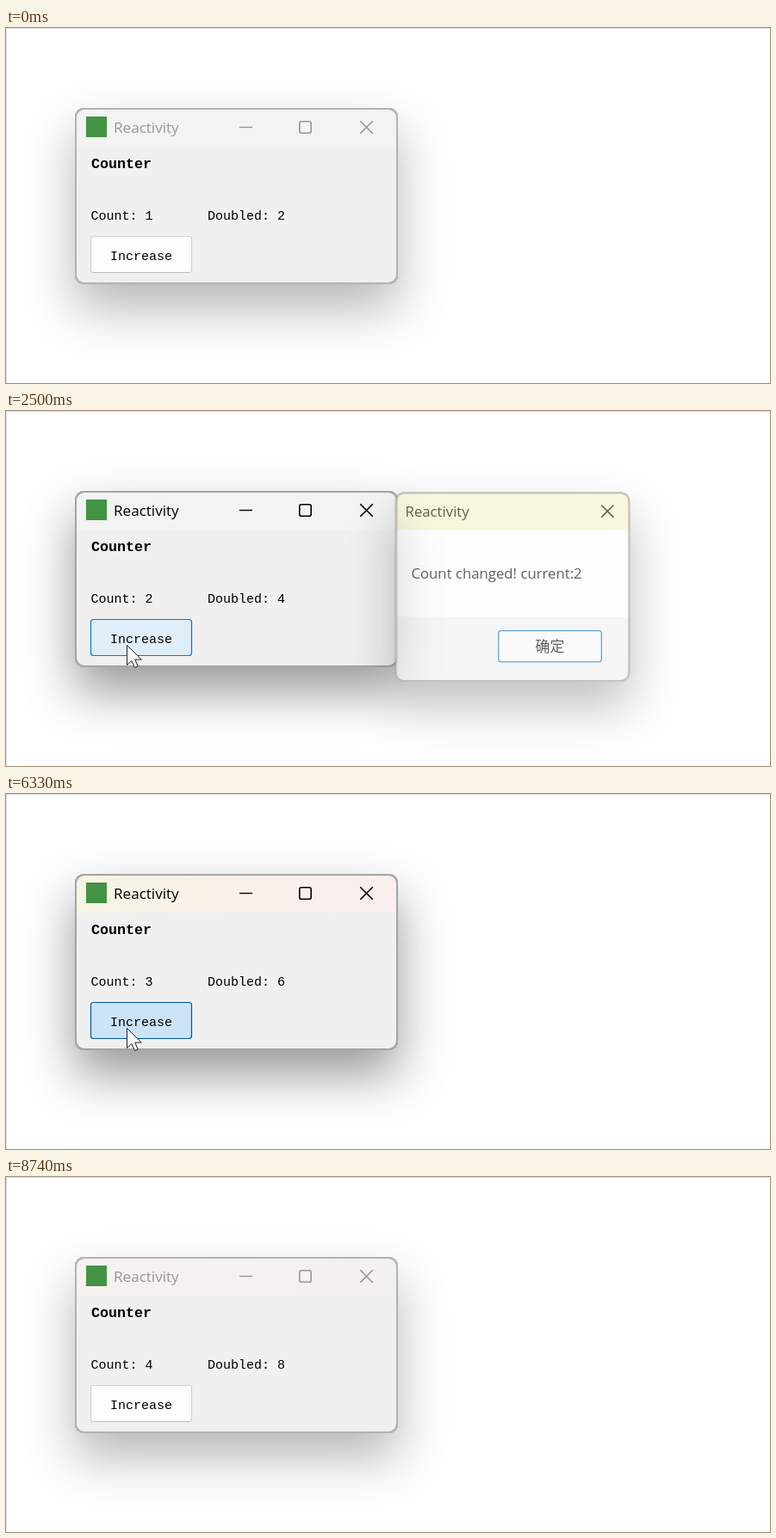
Recreate the animation shown at these times as an HTML page with a canvas. Size 887 by 413 pixels, loop 8.8 s.

```html
<!DOCTYPE html>
<html lang="en">
<head>
<meta charset="utf-8">
<title>Reactivity</title>
<style>
  html, body { margin: 0; width: 100%; height: 100%; overflow: hidden; background: #fefefe; }
  canvas { display: block; }
</style>
</head>
<body>
<canvas id="stage" width="887" height="413"></canvas>
<script>
const ctx = document.getElementById('stage').getContext('2d');
const LOOP = 8800;
const UI = '17.1px "Open Sans", "Noto Sans", sans-serif';
const MONO = '15px "Liberation Mono", monospace';
const MONO_BOLD = 'bold 16.7px "Liberation Mono", monospace';
const CJK = '17.3px "Noto Sans CJK SC", "Noto Sans CJK", sans-serif';

// One entry per click: press, dialog opening, dialog closing.
const rounds = [
  { click: 1480, open: 1740, opened: 1970, close: 2500, hold: 130 },
  { click: 3390, open: 3740, opened: 3940, close: 4460, hold: 60 },
  { click: 6190, open: 6450, opened: 6680, close: 7010, hold: 60 }
];

const clamp = v => Math.min(1, Math.max(0, v));
const ramp = (t, a, b) => clamp((t - a) / (b - a));
const easeOut = p => 1 - (1 - p) ** 3;
const lerp = (a, b, p) => a + (b - a) * p;
const mix = (a, b, p) => a.map((v, i) => lerp(v, b[i], p));
const rgb = c => `rgb(${c.map(Math.round)})`;

function box(x, y, w, h, r) {
  ctx.beginPath();
  ctx.roundRect(x, y, w, h, r);
}

function line(color, width, ...pts) {
  ctx.strokeStyle = color;
  ctx.lineWidth = width;
  ctx.beginPath();
  for (let i = 0; i < pts.length; i += 4) {
    ctx.moveTo(pts[i], pts[i + 1]);
    ctx.lineTo(pts[i + 2], pts[i + 3]);
  }
  ctx.stroke();
}

function text(str, x, y, font, color = '#000', align = 'left') {
  ctx.font = font;
  ctx.fillStyle = color;
  ctx.textAlign = align;
  ctx.fillText(str, x, y);
}

function gradient(x0, y0, x1, y1, ...colors) {
  const g = ctx.createLinearGradient(x0, y0, x1, y1);
  colors.forEach((c, i) => g.addColorStop(i / (colors.length - 1), c));
  return g;
}

function shadow(x, y, w, h, strength) {
  ctx.save();
  box(x, y, w, h, 10);
  ctx.rect(-500, -500, 2000, 2000);
  ctx.clip('evenodd');
  ctx.shadowColor = `rgba(0,0,0,${strength})`;
  ctx.shadowBlur = 56;
  ctx.shadowOffsetY = 28;
  ctx.fillStyle = '#000';
  box(x, y, w, h, 10);
  ctx.fill();
  ctx.restore();
}

function frameLine(x, y, w, h, color) {
  ctx.strokeStyle = color;
  ctx.lineWidth = 2;
  box(x + 1, y + 1, w - 2, h - 2, 10);
  ctx.stroke();
}

function cross(x, y, color) {
  line(color, 1.6, x, y, x + 14.5, y + 14.5, x + 14.5, y, x, y + 14.5);
}

// Strength of the main window's focus shadow.
function focusLevel(t) {
  let level = 0;
  for (const r of rounds) {
    if (t >= r.close) level = 1;
    else if (t >= r.click + 200) level *= 1 - ramp(t, r.click + 200, r.click + 270);
  }
  return level * (1 - ramp(t, 8610, 8740));
}

function isActive(t) {
  if (t >= 8610) return false;
  let active = false;
  for (const r of rounds) {
    if (t >= r.click + 70) active = true;
    if (t >= r.click + 200) active = false;
    if (t >= r.close) active = true;
  }
  return active;
}

function titleTint(t, count) {
  const r = rounds.findLast(r => t >= r.open);
  if (!r || t < r.close + r.hold) return null;
  return count === 4 || r === rounds[2]
    ? gradient(82, 0, 453, 0, '#f9efed', '#f5f0ed', '#f2f0ed')
    : gradient(82, 0, 453, 0, '#f7f4e4', '#f8f0ea', '#f9efee');
}

function buttonColors(t) {
  const hover = ramp(t, 930, 1210) * (1 - ramp(t, 7650, 7880));
  let press = 0;
  for (const { click: c } of rounds) {
    press = Math.max(press, ramp(t, c - 30, c + 90) * (1 - ramp(t, c + 270, c + 490)));
  }
  const fill = mix(mix([253, 253, 253], [224, 238, 249], hover), [204, 228, 247], press);
  const edge = mix(mix([208, 208, 208], [0, 120, 212], hover), [0, 84, 153], press);
  return { fill: rgb(fill), edge: rgb(edge), hover };
}

function drawMain(t) {
  const count = 1 + rounds.filter(r => t >= r.click + 200).length;
  const active = isActive(t);
  const focus = focusLevel(t);
  const ink = active ? '#000' : '#969696';

  shadow(80, 93, 375, 205, lerp(0.28, 0.4, focus));
  ctx.save();
  box(81, 94, 373, 203, 10);
  ctx.clip();
  ctx.fillStyle = '#f0f0f0';
  ctx.fillRect(80, 93, 375, 205);
  ctx.fillStyle = '#f3f3f3';
  ctx.fillRect(80, 93, 375, 45);
  const tint = titleTint(t, count);
  if (tint) {
    ctx.globalAlpha = active ? 1 : 0.6;
    ctx.fillStyle = tint;
    ctx.fillRect(80, 93, 375, 45);
  }
  ctx.restore();
  frameLine(80, 93, 375, 205, rgb(mix([178, 178, 178], [164, 164, 164], focus)));

  ctx.fillStyle = '#429444';
  ctx.fillRect(93, 103, 24, 24);
  text('Reactivity', 125, 122, UI, ink);
  line(ink, 1.4, 271, 115.5, 286, 115.5);
  ctx.lineWidth = 1.6;
  box(340.8, 108.8, 13.4, 13.4, 2);
  ctx.stroke();
  cross(411.3, 108.3, ink);

  text('Counter', 99, 163, MONO_BOLD);
  text('Count: ' + count, 98.5, 223, MONO);
  text('Doubled: ' + count * 2, 234, 223, MONO);

  const b = buttonColors(t);
  box(98.5, 242.5, 117, 42, 3);
  ctx.fillStyle = b.fill;
  ctx.fill();
  ctx.strokeStyle = b.edge;
  ctx.lineWidth = 1.2;
  ctx.stroke();
  if (b.hover < 0.5) line('#bcbcbc', 1, 101, 284.5, 213, 284.5);
  text('Increase', 157, 270, MONO, '#000', 'center');
}

function drawDialog(t) {
  const i = rounds.findIndex(r => t >= r.open && t < r.close + 270);
  if (i < 0) return;
  const r = rounds[i];
  const closing = t >= r.close;
  const out = ramp(t, r.close + r.hold, r.close + 250);
  const scale = closing ? lerp(0.98, 0.92, out) : lerp(0.87, 1, easeOut(ramp(t, r.open, r.opened)));
  const alpha = closing ? 0.62 * (1 - out) : ramp(t, r.open - 5, r.open + 72);
  if (alpha <= 0) return;

  ctx.save();
  ctx.globalAlpha = alpha;
  ctx.translate(490, 165);
  ctx.scale(scale, scale);
  ctx.translate(-490, -165);

  shadow(451, 93, 278, 225, 0.4);
  ctx.save();
  box(452, 94, 276, 223, 10);
  ctx.clip();
  ctx.fillStyle = closing ? '#f6f4c7' : gradient(452, 100, 728, 170, '#f9f0ec', '#f9eeee', '#f0f0f9');
  ctx.fillRect(451, 93, 278, 45);
  ctx.fillStyle = '#fefefe';
  ctx.fillRect(451, 138, 278, 103);
  ctx.fillStyle = '#f0f0f0';
  ctx.fillRect(451, 241, 278, 77);
  ctx.restore();
  frameLine(451, 93, 278, 225, '#a4a4a4');

  text('Reactivity', 463, 122, UI);
  cross(695.3, 108.3, '#000');
  text('Count changed! current:' + (i + 2), 470, 196, UI);

  box(573.5, 257.5, 122, 37, 3);
  ctx.fillStyle = '#fdfdfd';
  ctx.fill();
  ctx.strokeStyle = '#0070c0';
  ctx.lineWidth = 1.3;
  ctx.stroke();
  text('确定', 634.3, 282, CJK, '#000', 'center');
  ctx.restore();
}

function cursorAt(t) {
  if (t >= 530 && t < 7680) {
    const p = easeOut(ramp(t, 530, 1210));
    return [lerp(160, 140, p), lerp(375, 272, p)];
  }
  if (t >= 8080 && t < 8210) {
    const p = ramp(t, 8080, 8150);
    return [lerp(760, 802, p), lerp(394, 402, p)];
  }
  return null;
}

function drawCursor(t) {
  const pos = cursorAt(t);
  if (!pos) return;
  ctx.save();
  ctx.translate(pos[0] + 0.5, pos[1] + 0.5);
  ctx.fill(new Path2D());
  const arrow = new Path2D('M0 0V23L5.3 18L9 26L12.7 24.4L9.2 16.6H16.8Z');
  ctx.fillStyle = '#fff';
  ctx.fill(arrow);
  ctx.strokeStyle = '#222';
  ctx.lineWidth = 1;
  ctx.stroke(arrow);
  ctx.restore();
}

function draw(t) {
  ctx.fillStyle = '#fefefe';
  ctx.fillRect(0, 0, 887, 413);
  drawMain(t);
  drawDialog(t);
  ctx.fillStyle = '#dedede';
  ctx.fillRect(0, 0, 887, 1);
  ctx.fillRect(0, 0, 1, 413);
  drawCursor(t);
}

const start = performance.now();
function tick() {
  draw((performance.now() - start) % LOOP);
  requestAnimationFrame(tick);
}
tick();
</script>
</body>
</html>
```
